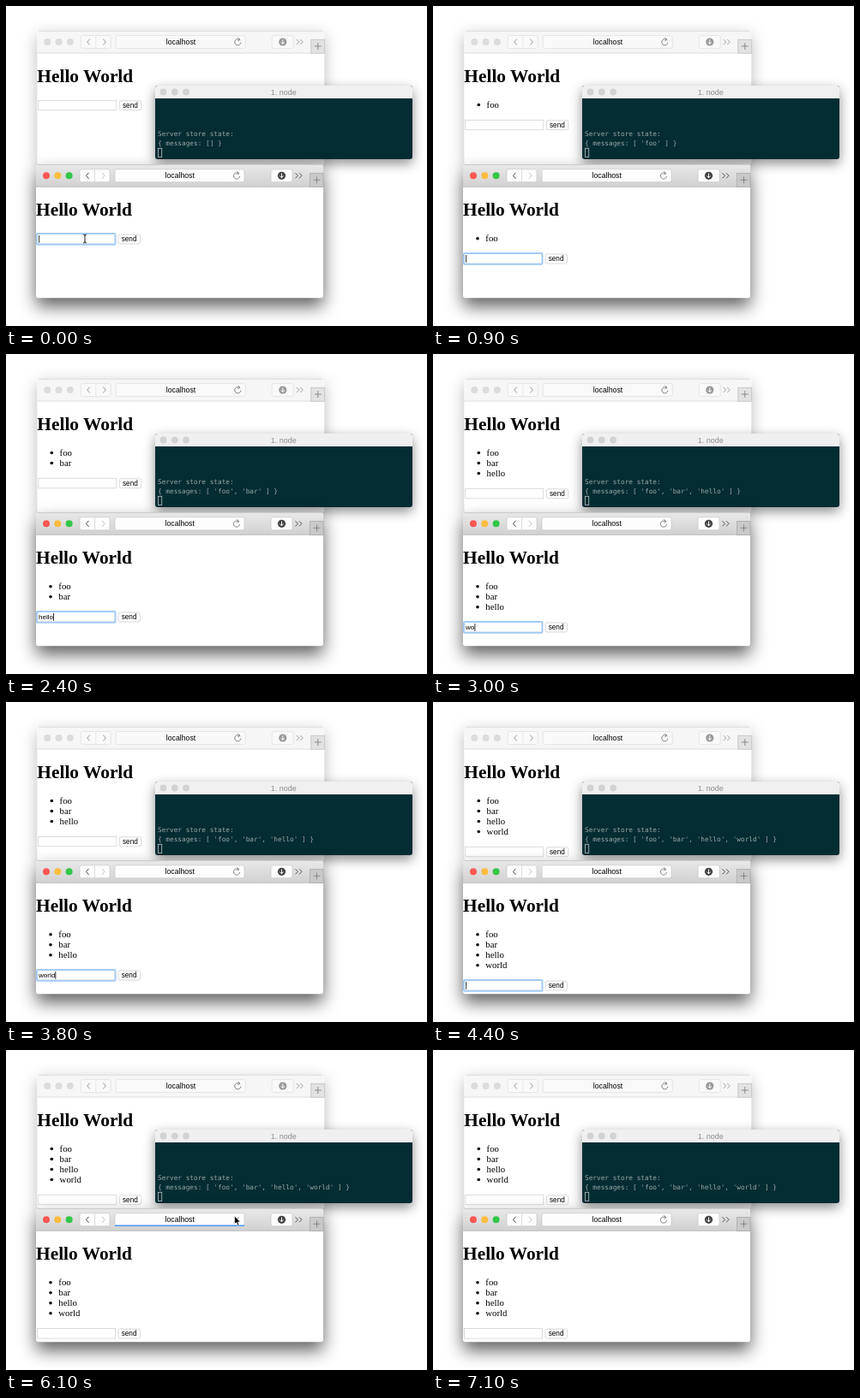
Recreate the animation shown at these times as an HTML page. Size 491 by 374 pixels, loop 7200 ms.

```html
<!DOCTYPE html>
<html lang="en">
<head>
<meta charset="utf-8">
<title>Synced messages</title>
<style>
  html, body { margin: 0; width: 100%; height: 100%; overflow: hidden; background: #fff; }
  svg { display: block; width: 491px; height: 374px; }
  text { white-space: pre; }
  .serif { font-family: "Liberation Serif", Times, serif; font-size: 10.8px; }
  .title { font-size: 21.4px; font-weight: bold; }
  .sans { font-family: "Liberation Sans", Arial, sans-serif; font-size: 8px; }
  .mid { text-anchor: middle; }
  .mono { font-family: "DejaVu Sans Mono", monospace; font-size: 7.75px; fill: #9aa9a9; }
  .shade { filter: drop-shadow(0 5px 9px rgba(0, 0, 0, .27)); }
  .term .shade { filter: drop-shadow(0 5px 7px rgba(0, 0, 0, .45)); }
  .front .shade { filter: drop-shadow(0 10px 10px rgba(0, 0, 0, .62)); }
  .line { fill: none; stroke-width: 1; }
</style>
</head>
<body>
<svg id="stage" viewBox="0 0 491 374">
  <defs>
    <linearGradient id="bar" x2="0" y2="1">
      <stop stop-color="#e9e9e9"/><stop offset="1" stop-color="#d1d1d1"/>
    </linearGradient>
  </defs>
</svg>
<script>
const LOOP = 7200, STEP = 100;
const stage = document.getElementById('stage');

// Each message: key press times, then the time it is sent.
const messages = [
  { text: 'foo', keys: [400, 500, 600], sent: 800 },
  { text: 'bar', keys: [1100, 1200, 1300], sent: 1500 },
  { text: 'hello', keys: [1800, 1900, 2000, 2200, 2300], sent: 2500 },
  { text: 'world', keys: [2900, 3000, 3200, 3300, 3500], sent: 4000 }
];
const RELOAD = 5700, LOADED = 6300, BLINK = 600;

const rect = (x, y, w, h, fill, extra = '') =>
  `<rect x="${x}" y="${y}" width="${w}" height="${h}" fill="${fill}" ${extra}/>`;
const path = (d, stroke, extra = '') =>
  `<path class="line" d="${d}" stroke="${stroke}" ${extra}/>`;
const dots = (xs, y, r, fills) =>
  xs.map((x, i) => `<circle cx="${x}" cy="${y}" r="${r}" fill="${fills[i]}"/>`).join('');

function addGroup(markup, x = 0, y = 0, name = '') {
  const g = document.createElementNS('http://www.w3.org/2000/svg', 'g');
  g.setAttribute('transform', `translate(${x} ${y})`);
  g.setAttribute('class', name);
  g.innerHTML = markup;
  stage.append(g);
  return g;
}

function browser(x, y, active) {
  const ink = active ? '#444' : '#999', faint = active ? '#c4c4c4' : '#999';
  const edge = active ? '#c6c6c6' : '#dedede', field = active ? '#fdfdfd' : '#f9f9f9';
  const box = (bx, w) => rect(bx, 5.5, w, 15, field, `rx="2" stroke="${edge}" stroke-width=".7"`);
  const lights = active ? ['#fc5753', '#fdbc40', '#33c748'] : Array(3).fill('#dcdcdc');
  return addGroup(`
    ${rect(0, 0, 335, 156, '#fff', 'rx="3" class="shade"')}
    <path d="M0 26V3Q0 0 3 0H332Q335 0 335 3V26Z" fill="${active ? 'url(#bar)' : '#f6f6f6'}"/>
    ${path('M2 .3H333', active ? '#c9c9c9' : '#dcdcdc', 'stroke-width=".6"')}
    ${path('M0 26H335', active ? '#b5b5b5' : '#d4d4d4', 'style="stroke-width:.8"')}
    ${dots([12, 25.3, 38.6], 13, 4, lights)}
    ${box(51, 35)}${path('M68.5 6V20', edge, 'style="stroke-width:.6"')}
    ${path('M61.5 9.5L58.5 13L61.5 16.5', ink)}${path('M77 9.5L80 13L77 16.5', faint)}
    ${box(92, 151)}
    <text class="sans mid" x="167.7" y="16" style="font-size:8.7px">localhost</text>
    <rect class="load" x="92" y="19.2" width="0" height="1.5" fill="#4a98f5"/>
    <g class="reload">${path('M237 11.2A3.6 3.6 0 1 0 237.6 13.6M234.3 8L236.5 10.2L234 11.8', '#666', 'style="stroke-width:.8"')}</g>
    <g class="stop" visibility="hidden">${path('M231 10.3L236.6 16M236.6 10.3L231 16', '#555')}</g>
    ${box(274, 25)}${dots([286.5], 13, 4.6, [ink])}
    ${path('M286.5 10.3V15.2M284.4 13.3L286.5 15.5L288.6 13.3', '#fff')}
    ${path('M302.5 10L305.5 13L302.5 16M307 10L310 13L307 16', ink, 'style="stroke-width:.9"')}
    ${rect(319.5, 10.2, 15.5, 16, active ? '#c9c9c9' : '#e2e2e2', `stroke="${active ? '#a6a6a6' : '#bdbdbd'}" stroke-width=".7"`)}
    ${path('M323.5 18H331.5M327.5 14V22', '#777', 'style="stroke-width:.8"')}
    <text class="serif title" x="0" y="60">Hello World</text>
    ${messages.map((m, i) => `<g class="item" transform="translate(0 ${12 * i})">
      ${dots([17], 86.5, 1.8, ['#000'])}<text class="serif" x="26.3" y="89.7">${m.text}</text></g>`).join('')}
    <g class="form">
      ${rect(1.5, -5.7, 91, 11.5, '#fff', 'stroke="#d2d2d2" stroke-width=".8"')}
      <rect class="focus" x="1" y="-6.2" width="91.5" height="12.6" rx="1" fill="none" stroke="#a3cbf5" stroke-width="2"/>
      <text class="sans typed" x="3" y="2.9"></text>
      <rect class="caret" y="-4.3" width=".8" height="8.8"/>
      ${rect(96, -5.3, 25.5, 11, '#fff', 'rx="2" stroke="#d0d0d0" stroke-width=".8"')}
      <text class="sans mid" x="108.6" y="2.9" style="font-size:8.2px">send</text>
    </g>`, x, y, active ? 'front' : 'back');
}

const back = browser(36.3, 29, false);
const terminal = addGroup(`
  ${rect(0, 0, 300, 86, '#042c33', 'rx="3" class="shade"')}
  <path d="M0 15V3Q0 0 3 0H297Q300 0 300 3V15Z" fill="#f0f0f0"/>
  ${dots([9.5, 22.8, 36.1], 7.5, 3.9, Array(3).fill('#d2d2d2'))}
  <text class="sans mid" x="149.7" y="10.7" fill="#8c8c8c" style="font-size:9px">1. node</text>
  <text class="mono" x="3" y="58.7">Server store state:</text>
  <text class="mono store" x="3" y="69.8"></text>
  ${rect(3.5, 73.3, 4.2, 10.2, 'none', 'stroke="#a9b5b5" stroke-width=".9"')}`, 174, 93, 'term');
const front = browser(35, 185.3, true);

const beam = addGroup(path('M-2 -5Q0 -5 0 -3.5Q0 -5 2 -5M0 -4V4M-2 5Q0 5 0 3.5Q0 5 2 5', '#222'), 92, 272);
const arrow = addGroup('<path d="M0 0V9.6L2.2 7.6L3.8 11.2L5.4 10.5L3.9 7H6.9Z" stroke="#fff" stroke-width=".7"/>');

const show = (el, on) => el.setAttribute('visibility', on ? 'visible' : 'hidden');
const ease = p => p * p * (3 - 2 * p);
const part = (t, from, to) => Math.min(1, Math.max(0, (t - from) / (to - from)));

function drawPage(win, count, typed, focus, caret) {
  const $ = name => win.querySelector('.' + name);
  win.querySelectorAll('.item').forEach((el, i) => show(el, i < count));
  $('form').setAttribute('transform', `translate(0 ${count ? 98 + 12 * count : 87})`);
  const text = $('typed');
  text.textContent = typed;
  $('caret').setAttribute('x', 3.3 + (typed ? text.getComputedTextLength() : 0));
  show($('caret'), caret);
  show($('focus'), focus);
}

function draw(t) {
  const count = messages.filter(m => t >= m.sent).length;
  const next = messages[count];
  const typed = next ? next.text.slice(0, next.keys.filter(k => t >= k).length) : '';
  const focus = t < RELOAD;
  const lastEdit = Math.max(0, ...messages.flatMap(m => [...m.keys, m.sent]).filter(k => k <= t));
  const caret = focus && Math.floor((t - lastEdit) / BLINK) % 2 === 0;

  drawPage(back, count, '', false, false);
  drawPage(front, count, typed, focus, caret);

  const list = messages.slice(0, count).map(m => `'${m.text}'`).join(', ');
  terminal.querySelector('.store').textContent = `{ messages: [${list && ` ${list} `}] }`;

  const loading = t >= RELOAD && t < LOADED;
  front.querySelector('.load').setAttribute('width', loading ? 151 * ease(part(t, RELOAD, 6000)) : 0);
  show(front.querySelector('.reload'), !loading);
  show(front.querySelector('.stop'), loading);

  const go = ease(part(t, 4600, 5100)), settle = ease(part(t, 5100, 5400));
  arrow.setAttribute('transform', `translate(${92 + 166 * go + 8.5 * settle} ${272 - 69 * go - 9 * settle})`);
  show(arrow, t >= 4600 && t < 6600);
  show(beam, t < messages[0].keys[0]);
}

const start = performance.now();
function tick() {
  const t = (performance.now() - start) % LOOP;
  draw(Math.floor(t / STEP) * STEP);
  requestAnimationFrame(tick);
}
tick();
</script>
</body>
</html>
```
